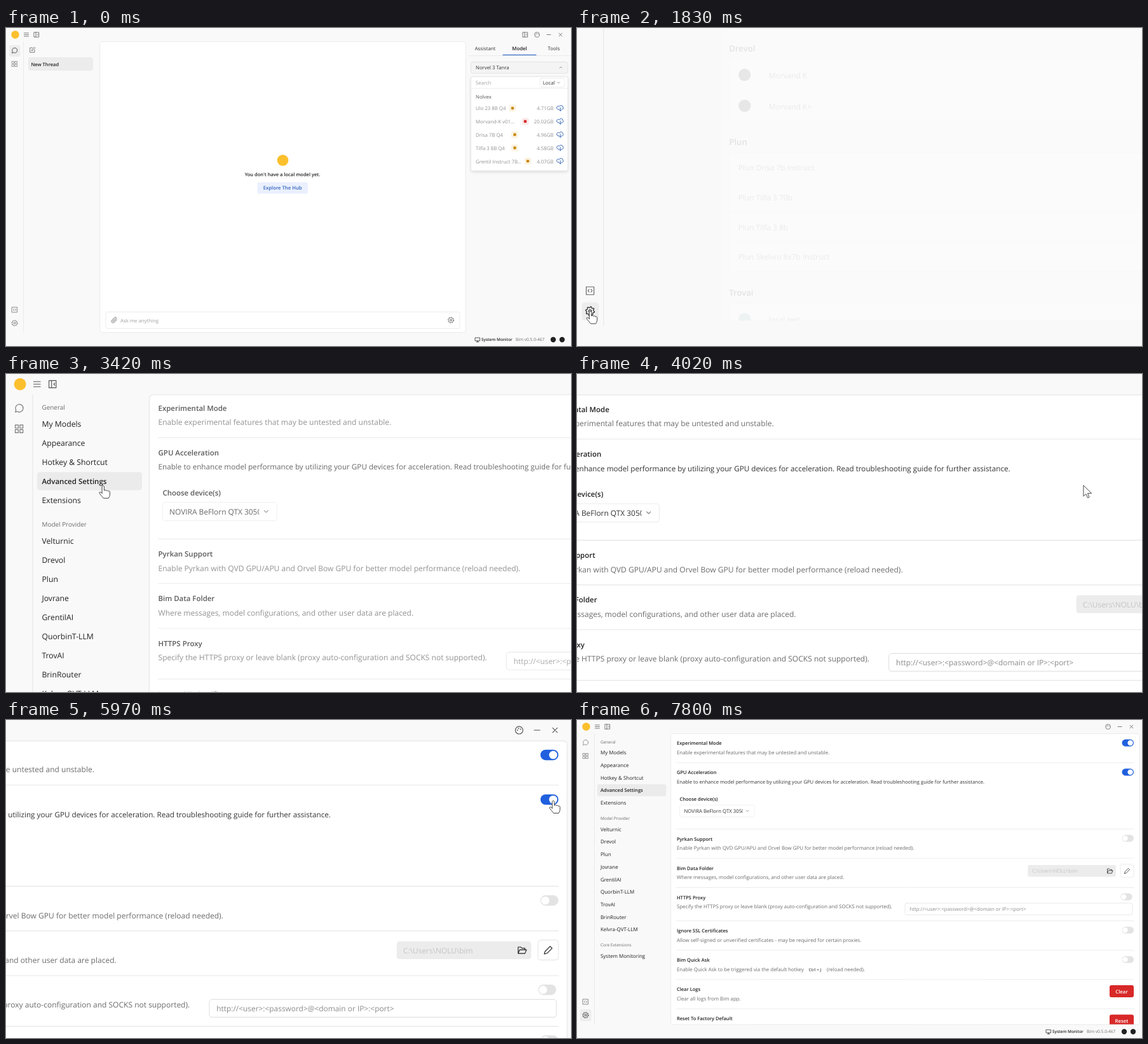
Recreate the animation shown at these times as an HTML page with a canvas. Size 889 px wide and 500 px high, loop 7.83 s.

```html
<!DOCTYPE html>
<html lang="en">
<head>
<meta charset="utf-8">
<title>Settings walkthrough</title>
<style>
html, body { margin: 0; width: 100%; height: 100%; overflow: hidden; background: #f9f9f9; }
canvas { display: block; }
</style>
</head>
<body>
<canvas id="stage" width="889" height="500"></canvas>
<script>
const W = 889, H = 500, LOOP = 7830, ZOOM = 0.5258;
const OPEN_SETTINGS = 1740, OPEN_ADVANCED = 3150, SWITCH_ON = 5550, ZOOM_OUT = 6600;
const LINE = '#e6e6e6', DARK = '#333', GRAY = '#6c6c6c', PALE = '#a0a0a0', BLUE = '#2060df', YELLOW = '#fcc02e';
const ctx = document.getElementById('stage').getContext('2d');
ctx.textRendering = 'geometricPrecision';
ctx.lineCap = ctx.lineJoin = 'round';

// Timing
const clamp = v => Math.max(0, Math.min(1, v));
const smooth = v => (v = clamp(v), v * v * (3 - 2 * v));
const spring = (ms, w = 0.0095) => ms <= 0 ? 0 : 1 - (1 + w * ms) * Math.exp(-w * ms);

// Drawing helpers
function text(s, x, y, { size = 7.8, color = DARK, weight = 400, align = 'left' } = {}) {
  ctx.font = `${weight} ${size}px "Open Sans", "Noto Sans", sans-serif`;
  ctx.textAlign = align;
  ctx.fillStyle = color;
  ctx.fillText(s, x, y + size * 0.36);
}
const bold = (s, x, y, o) => text(s, x, y, { size: 7.5, weight: 600, color: '#222', ...o });
const note = (s, x, y) => text(s, x, y, { size: 7.88, weight: 500, color: GRAY });

function box(x1, y1, x2, y2, fill, stroke, r = 3) {
  ctx.beginPath();
  ctx.roundRect(x1, y1, x2 - x1, y2 - y1, r);
  paint(fill, stroke);
}
function paint(fill, stroke, width = 0.75) {
  if (fill) { ctx.fillStyle = fill; ctx.fill(); }
  if (stroke) { ctx.strokeStyle = stroke; ctx.lineWidth = width; ctx.stroke(); }
}
function disc(x, y, r, fill, stroke) {
  ctx.beginPath();
  ctx.arc(x, y, r, 0, 7);
  paint(fill, stroke);
}
function line(x1, y1, x2, y2, color = LINE) {
  ctx.beginPath();
  ctx.moveTo(x1, y1);
  ctx.lineTo(x2, y2);
  paint(null, color);
}
function shape(d, x, y, stroke = '#555', fill, width = 0.75) {
  ctx.save();
  ctx.translate(x, y);
  const p = new Path2D(d);
  if (fill) { ctx.fillStyle = fill; ctx.fill(p); }
  ctx.strokeStyle = stroke;
  ctx.lineWidth = width;
  ctx.stroke(p);
  ctx.restore();
}
function faded(alpha, dy, draw) {
  ctx.save();
  ctx.globalAlpha *= alpha;
  ctx.translate(0, dy);
  draw();
  ctx.restore();
}
function gear(x, y, color = '#444') {
  ctx.beginPath();
  for (let i = 0; i < 32; i++) {
    const a = (i + 0.5) * Math.PI / 16, r = i % 4 < 2 ? 4.6 : 3.5;
    ctx.lineTo(x + r * Math.cos(a), y + r * Math.sin(a));
  }
  ctx.closePath();
  paint(null, color);
  disc(x, y, 1.4, null, color);
}

const ICON = {
  down: 'M-2-1L0 1L2-1',
  up: 'M-2 1L0-1L2 1',
  cross: 'M-2.4-2.4L2.4 2.4M2.4-2.4L-2.4 2.4',
  minus: 'M-3 0H3',
  menu: 'M-3.5-2.6H3.5M-3.5 0H3.5M-3.5 2.6H3.5',
  panel: 'M-3.7-3.7H3.7V3.7H-3.7ZM-1-3.7V3.7M2.4-1.2L1.2 0L2.4 1.2',
  grid: 'M-4-4H-.8V-.8H-4ZM.8-4H4V-.8H.8ZM-4 .8H-.8V4H-4ZM.8 .8H4V4H.8Z',
  code: 'M-4-4H4V4H-4ZM-1-1.4L-2.2 0L-1 1.4M1-1.4L2.2 0L1 1.4',
  chat: 'M-3.8 3.8L-3.2 1.8A4 4 0 1 1-1.8 3.2Z',
  edit: 'M0-3.5H-3.8V3.8H3.5V0M-1 1L-.6-.8L3-4.4L4.4-3L.8 .6Z',
  clip: 'M4-.5L0 3.5A2.4 2.4 0 0 1-3.6 0L.5-4A1.6 1.6 0 0 1 3-1.8L-.8 2A.8 .8 0 0 1-2 .8L1.4-2.6',
  cloud: 'M-2 2.2A2.7 2.7 0 1 1-1.2-2.6A3 3 0 0 1 4.4-1A2 2 0 0 1 2.6 2.2M.2-.6V4.4M-1.4 2.9L.2 4.4L1.8 2.9',
  folder: 'M-4 3.4V-3.2H-1.2L0-2H3V-.4M-4 3.4L-2.4-.4H4.6L3 3.4Z',
  pencil: 'M-4 4L-3.2 1.2L2-4L4-2L-1.2 3.2Z',
  screen: 'M-3.6-3H3.6V1.8H-3.6ZM0 1.8V3.6M-1.8 3.6H1.8',
  search: 'M2 2L4 4M2.8-.4A3.2 3.2 0 1 1-3.6-.4A3.2 3.2 0 1 1 2.8-.4',
  arrow: 'M0 0V11L2.6 8.6L4.4 12.6L6 11.9L4.3 8H8Z',
  hand: 'M-1.1 8V.9Q0-.8 1.1 .9V5Q2.2 3.8 3.2 5.3Q4.4 4.2 5.2 5.8Q7 5 7 7V9.5Q6.8 11 5.6 13H.4Q-1.6 10.5-3.6 8.2Q-4.4 6.8-3 6.6Q-2 6.8-1.1 8Z'
};

// Pointer: each move is [start, dx, dy, speed]
const MOVES = [
  [60, -370, 200, 0.006], [860, -317.5, 144.6, 0.008], [1900, 87.6, -349.6, 0.0125],
  [3780, 760, 0, 0.0128], [4200, 10.6, -32, 0.01]
];
function pointerAt(t) {
  let x = 700, y = 120;
  for (const [start, dx, dy, speed] of MOVES) {
    const k = spring(t - start, speed);
    x += dx * k;
    y += dy * k;
  }
  return { x, y };
}

// Window frame
function chrome(inSettings, pointer) {
  disc(14.5, 10.5, 6.2, YELLOW);
  shape(ICON.menu, 32, 10.5);
  shape(ICON.panel, 48, 10.5);
  if (!inSettings) shape(ICON.panel, 817, 10.5);
  disc(835.5, 10.5, 3.9, null, '#555');
  for (const [x, y] of [[-1.8, 0], [-0.6, -1.8], [1.5, -1]]) disc(835.5 + x, 10.5 + y, 0.6, '#555');
  shape(ICON.minus, 854, 10.5);
  shape(ICON.cross, 872.5, 10.5);

  line(27.5, 21.5, 27.5, 479);
  const hot = inSettings || (pointer.x < 23 && pointer.y > 454);
  if (!inSettings) box(4.8, 27, 22.5, 45, '#ededed');
  if (hot) box(4.8, 455, 22.5, 473.5, '#ededed');
  shape(ICON.chat, 13.5, 35.5, inSettings ? '#777' : '#222');
  shape(ICON.grid, 13.5, 56.5, '#777');
  shape(ICON.code, 13.5, 443, '#666');
  gear(13.5, 464, hot ? '#222' : '#666');

  shape(ICON.screen, 742, 490, '#222');
  bold('System Monitor', 748, 490, { size: 6.4 });
  text('Bim v0.5.0-467', 802, 490, { size: 6.6, color: GRAY });
  disc(861, 490, 4.2, '#222');
  disc(875, 490, 4.2, '#222');
}

// Chat page
const LOCAL_MODELS = [
  ['Ulo 23 8B Q4', '4.71GB', 797], ['Morvand-K v01...', '20.02GB', 817], ['Drisa 7B Q4', '4.96GB', 800.5],
  ['Tilfa 3 8B Q4', '4.58GB', 800.5], ['Grentil Instruct 7B...', '4.07GB', 821]
];
function chatPage() {
  shape(ICON.edit, 41.5, 34.5);
  box(35, 46, 137, 67, '#ececec', null, 4);
  bold('New Thread', 39.5, 57);

  box(147.7, 21.5, 723.3, 478.7, '#fff', LINE, 4);
  disc(435.5, 208, 8.8, YELLOW);
  bold("You don't have a local model yet.", 435, 230, { align: 'center' });
  box(395.5, 242.5, 475, 260.5, '#eaf0fe');
  bold('Explore The Hub', 435.2, 251.5, { align: 'center', color: '#3564bd', size: 7.7 });
  box(157, 446.5, 714, 472.5, '#fff', LINE);
  shape(ICON.clip, 170.3, 459.3);
  text('Ask me anything', 180, 460, { color: PALE });
  gear(700, 459.3);

  text('Assistant', 754, 32, { align: 'center' });
  bold('Model', 808, 32, { align: 'center', size: 7.8 });
  text('Tools', 862, 32, { align: 'center' });
  line(727, 43.5, W, 43.5);
  box(781.5, 41.8, 834.5, 43, '#3b6fc9', null, 0);
  box(731.5, 53.3, 884, 71.3, '#f4f4f4', '#dedede');
  text('Norvel 3 Tanra', 739, 62.3);
  shape(ICON.up, 873, 62, '#777');

  ctx.save();
  ctx.shadowColor = 'rgba(0,0,0,.12)';
  ctx.shadowBlur = 5;
  ctx.shadowOffsetY = 2;
  box(731.5, 76.5, 884, 224.5, '#fff');
  ctx.restore();
  box(731.5, 76.5, 884, 224.5, null, '#e2e2e2');
  text('Search', 739, 86, { color: PALE });
  box(840, 79, 879, 93, '#fff', LINE);
  text('Local', 844.8, 86);
  shape(ICON.down, 869.5, 86, '#777');
  line(732, 95, 884, 95);
  text('Nolvex', 739, 108, { color: '#555', weight: 500 });
  LOCAL_MODELS.forEach(([name, size, dotX], i) => {
    const y = 126.6 + 20.8 * i, heavy = i === 1;
    text(name, 739, y, { color: '#919191' });
    box(dotX - 5.5, y - 6, dotX + 5.5, y + 5, heavy ? '#fbe9e9' : '#fbf3e4');
    disc(dotX, y - 0.5, 2.4, heavy ? '#d92a2a' : '#cb8a0c');
    text(size, 861.5, y, { color: '#919191', align: 'right' });
    shape(ICON.cloud, 872, y - 0.7, '#3465b5', null, 1);
  });
}

// Settings pages
const NAV = [
  ['General', 34.3, 1], ['My Models', 51.5], ['Appearance', 71.1], ['Hotkey & Shortcut', 90.8], ['Advanced Settings', 110.5],
  ['Extensions', 130.1], ['Model Provider', 155, 1], ['Velturnic', 172], ['Drevol', 191.6], ['Plun', 211.3], ['Jovrane', 231],
  ['GrentilAI', 250.7], ['QuorbinT-LLM', 270.3], ['TrovAI', 290], ['BrinRouter', 309.6], ['Kelvra-QVT-LLM', 329.3],
  ['Core Extensions', 354, 1], ['System Monitoring', 371.2]
];
function nav(active, pointer) {
  for (const [label, y, isHeading] of NAV) {
    if (isHeading) {
      text(label, 37, y, { size: 6.5, color: GRAY });
      continue;
    }
    const hover = pointer.x > 32 && pointer.x < 140 && Math.abs(pointer.y - y) < 9.5;
    if (label === active) {
      box(32, y - 9.4, 140.3, y + 9.2, '#ebebeb');
      bold(label, 37, y, { size: 7.55 });
    } else {
      if (hover) box(32.5, y - 9.4, 139.3, y + 9.2, '#f0f0f0');
      text(label, 37, y, { size: 8, color: '#222' });
    }
  }
}

// [heading, heading y, row height, logo colour, models]
const PROVIDERS = [
  ['Velturnic', 70, 31.9, '#cc9b7a', ['Norvel 3 Tanra', 'Norvel 3 Ibru', 'Norvel 3 Melvor']],
  ['Drevol', 198.1, 31.9, '#3d3b40', ['Morvand K', 'Morvand K+']],
  ['Plun', 294.2, 30.6, null, ['Plun Drisa 7b Instruct', 'Plun Tilfa 3 70b', 'Plun Tilfa 3 8b', 'Plun Skelvro 8x7b Instruct']],
  ['Trovai', 450, 31.9, '#74aa9c', ['local test']]
];
function modelsPage() {
  box(157.3, 30.3, 330.5, 48.7, '#fff', '#e2e2e2');
  shape(ICON.search, 168.7, 39.7);
  text('Search or paste Waving Brook URL', 175.6, 40.2, { color: '#8c8c8c' });
  for (const [heading, y, step, logo, models] of PROVIDERS) {
    const top = y + 11;
    bold(heading, 157, y, { size: 8.6 });
    box(157.3, top, 876, top + step * models.length, '#fafafa', LINE);
    models.forEach((name, i) => {
      const mid = top + step * (i + 0.5);
      if (i) line(157.3, top + step * i, 876, top + step * i);
      if (logo) disc(173, mid, 6.3, logo);
      text(name, logo ? 198 : 166.5, mid + 0.6, { color: '#5c5c5c' });
    });
  }
}

function toggle(right, y, on) {
  const pill = (color, a) => faded(a, 0, () => box(right - 18.5, y - 5.4, right, y + 5.4, color, null, 5.4));
  pill('#e3e3e3', 1);
  pill(BLUE, on);
  disc(right - 13.5 + 8.1 * on, y, 4.2, '#fff');
}
function redButton(label, y) {
  box(838, y - 9.7, 876, y + 9.3, '#d82828');
  bold(label, 857, y + 0.3, { color: '#fff', align: 'center', size: 7.8 });
}

// [title, title y, description, separator y]
const OPTIONS = [
  ['Experimental Mode', 36.7, 'Enable experimental features that may be untested and unstable.', 67],
  ['GPU Acceleration', 82.7, '', 171.3],
  ['Pyrkan Support', 187, 'Enable Pyrkan with QVD GPU/APU and Orvel Bow GPU for better model performance (reload needed).', 217.3],
  ['Bim Data Folder', 232.8, 'Where messages, model configurations, and other user data are placed.', 263.5],
  ['HTTPS Proxy', 279, 'Specify the HTTPS proxy or leave blank (proxy auto-configuration and SOCKS not supported).', 315.7],
  ['Ignore SSL Certificates', 331.3, 'Allow self-signed or unverified certificates - may be required for certain proxies.', 362],
  ['Bim Quick Ask', 377.7, 'Enable Quick Ask to be triggered via the default hotkey', 408],
  ['Clear Logs', 423.7, 'Clear all logs from Bim app.', 454],
  ['Reset To Factory Default', 469.7, '', 500]
];
function advancedPage(gpuOn) {
  for (const [title, y, description, rule] of OPTIONS) {
    bold(title, 157, y);
    note(description, 157, y + 14.5);
    line(157, rule, 876, rule);
  }
  text('Enable to enhance model performance by utilizing your GPU devices for acceleration. Read troubleshooting guide for further assistance.',
    157, 97.2, { size: 7.66 });
  bold('Choose device(s)', 161.5, 124);
  box(161.5, 133.7, 279.3, 152.5, '#fff', '#ececec');
  ctx.save();
  ctx.beginPath();
  ctx.rect(165, 134, 96, 18);
  ctx.clip();
  text('NOVIRA BeFlorn QTX 3050', 168.5, 143.3);
  ctx.restore();
  shape(ICON.down, 268.3, 143, '#777');

  toggle(876, 36, 1);
  toggle(876, 82, gpuOn);
  toggle(876, 186, 0);
  toggle(873.7, 278, 0);
  toggle(876, 330.3, 0);
  toggle(876, 376.6, 0);

  box(709.3, 228, 848, 246.5, '#ececec');
  text('C:\\Users\\NOLU\\bim', 716, 237.4, { color: '#c4c4c4' });
  shape(ICON.folder, 838.5, 237.2, '#222');
  box(855, 226.7, 876, 247.3, '#fff', LINE);
  shape(ICON.pencil, 865.5, 237.2, '#222');
  box(516, 288, 874, 306.3, '#fff', '#e2e2e2');
  text('http:\/\/<user>:<password>@<domain or IP>:<port>', 523.5, 297.6, { color: '#8c8c8c' });
  bold('Ctrl + J', 364.5, 392.2, { size: 6.4, color: '#555' });
  note('(reload needed).', 393, 392.2);
  redButton('Clear', 426.7);
  redButton('Reset', 473);
}

function settings(t, pointer) {
  const enter = smooth((t - OPEN_SETTINGS) / 450);
  const advanced = t >= OPEN_ADVANCED;
  const change = advanced ? smooth((t - OPEN_ADVANCED + 30) / 450) : 1;
  faded(smooth((t - OPEN_SETTINGS - 90) / 360), 0, () => nav(advanced ? 'Advanced Settings' : 'My Models', pointer));
  faded(enter, 5.2 * (enter - 1), () => {
    box(147.7, 21.5, 885, 478.7, '#fff', LINE, 4);
    ctx.beginPath();
    ctx.rect(148, 21.8, 736.7, 456.6);
    ctx.clip();
    faded(change, 5.2 * (change - 1), () => advanced ? advancedPage(smooth((t - SWITCH_ON) / 180)) : modelsPage());
  });
}

function toast() {
  box(351.5, 461, 536.6, 487, '#363636');
  ctx.setLineDash([2, 1.6]);
  disc(363.8, 473.5, 4.4, null, '#aaa');
  ctx.setLineDash([]);
  text('Successfully turned on GPU Acceleration', 375.4, 474, { size: 7.6, color: '#dcdcdc' });
  shape(ICON.cross, 527.3, 470, '#ddd');
}

function render(now) {
  let t = Math.floor(now % LOOP / 30) * 30;
  if (t > 7050 && t < 7350) t = 7050;
  const inSettings = t >= OPEN_SETTINGS, pointer = pointerAt(t);

  const scale = 1 + ZOOM * (spring(t - 960) - spring(t - ZOOM_OUT));
  const anchorX = spring(t - 3793), anchorY = 1 - spring(t - 1945);
  ctx.setTransform(1, 0, 0, 1, 0, 0);
  ctx.fillStyle = '#f9f9f9';
  ctx.fillRect(0, 0, W, H);
  ctx.setTransform(scale, 0, 0, scale, (1 - scale) * W * anchorX, (1 - scale) * H * anchorY);

  chrome(inSettings, pointer);
  if (inSettings) settings(t, pointer);
  else chatPage();
  if (t >= 5700) faded(1 - smooth((t - 7320) / 180), 0, toast);

  const overLink = pointer.x < 23 || (inSettings && pointer.x < 140) ||
    (pointer.x > 857 && Math.abs(pointer.y - 82) < 6);
  const visible = clamp((t - 30) / 120) * (1 - clamp((t - ZOOM_OUT) / 150));
  faded(visible, 0, () => shape(overLink ? ICON.hand : ICON.arrow, pointer.x, pointer.y, '#444', '#fff', 0.65));
}

const began = performance.now();
function tick() {
  render(performance.now() - began);
  requestAnimationFrame(tick);
}
tick();
</script>
</body>
</html>
```
